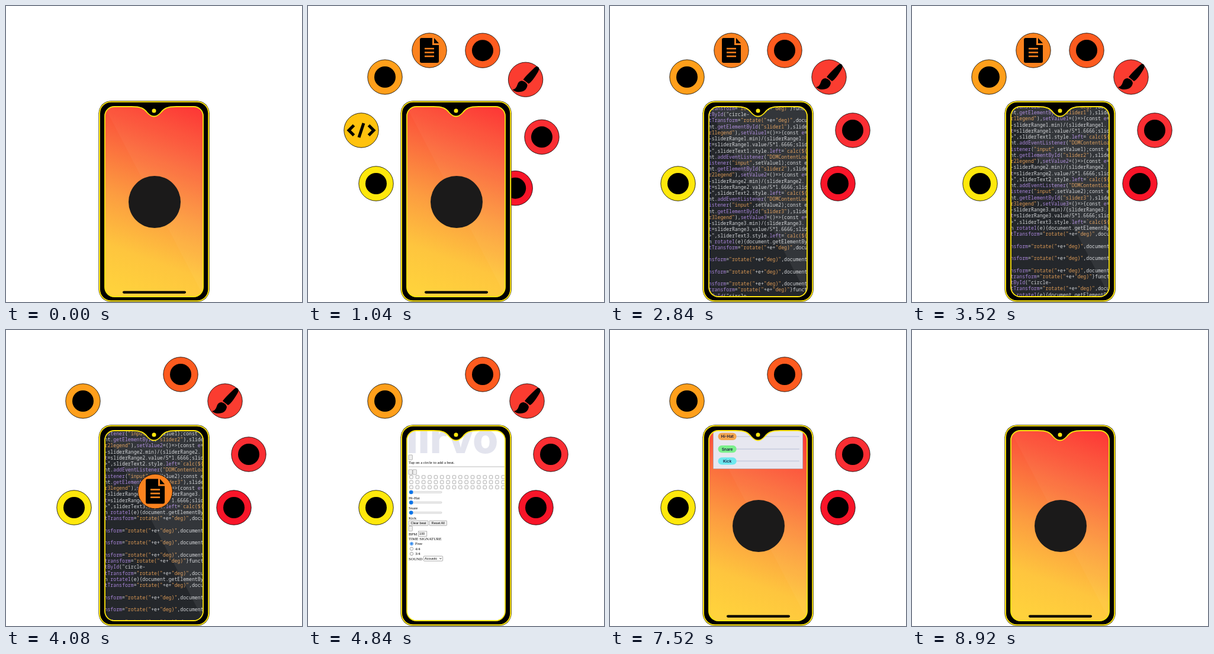
Recreate the animation shown at these times as an HTML page. Size 500x500 px, loop 9600 ms.

```html
<!DOCTYPE html>
<html lang="en">
<head>
<meta charset="utf-8">
<title>Phone and app icons</title>
<style>
html, body { margin: 0; width: 100%; height: 100%; overflow: hidden; background: #fff; }
svg { display: block; width: 100vw; height: 100vh; }
.mono { font: 8.2px "Noto Sans Mono", "DejaVu Sans Mono", monospace; fill: #d3d5d8; white-space: pre; }
.mono .s { fill: #dd9a55; }
.mono .f { fill: #ab87dc; }
.serif { font: 6.75px "Liberation Serif", serif; }
.ui { font: 5.65px "Liberation Sans", sans-serif; }
.mark { font-family: Inter, sans-serif; font-weight: 800; }
.chip { font: 600 7.8px Inter, sans-serif; fill: #16183f; text-anchor: middle; }
.btn { fill: #efefef; stroke: #777; stroke-width: .5; }
.box { fill: #fff; stroke: #777; stroke-width: .6; }
</style>
</head>
<body>
<svg viewBox="0 0 500 500">
  <defs>
    <path id="shape" d="M183 170H212C228 170 233 173 238.5 180Q250 193 261.5 180C267 173 272 170 288 170H317A16 16 0 0 1 333 186V475A16 16 0 0 1 317 491H183A16 16 0 0 1 167 475V186A16 16 0 0 1 183 170Z"/>
    <clipPath id="clip"><use href="#shape"/></clipPath>
    <linearGradient id="wall" gradientUnits="userSpaceOnUse" x1="318" y1="168" x2="202" y2="486">
      <stop offset="0" stop-color="#fd302f"/>
      <stop offset=".28" stop-color="#fb663d"/>
      <stop offset=".55" stop-color="#fc9c40"/>
      <stop offset=".8" stop-color="#fec53e"/>
      <stop offset="1" stop-color="#ffd23c"/>
    </linearGradient>
    <radialGradient id="glow">
      <stop offset=".5" stop-color="#2f3a9c" stop-opacity=".75"/>
      <stop offset="1" stop-color="#2f3a9c" stop-opacity="0"/>
    </radialGradient>
  </defs>

  <g id="back"></g>

  <rect x="156.5" y="160.2" width="187.2" height="339.6" rx="21"/>
  <rect x="158" y="161.7" width="184.2" height="336.6" rx="19.5" fill="none" stroke="#ffe60d" stroke-width="2"/>

  <g clip-path="url(#clip)">
    <rect x="166" y="168" width="168" height="324" fill="url(#wall)"/>
    <path d="M166 169H334V491Z" fill="#fff" opacity=".03"/>
    <circle cx="251" cy="331" r="44" fill="#1b1a1a"/>
    <rect x="197" y="481.5" width="107" height="4.2" rx="2.1"/>
    <g id="code">
      <rect x="162" y="165" width="176" height="328" fill="#24272b"/>
      <g id="lines" class="mono"></g>
      <path d="M166 169H334V491Z" fill="#fff" opacity=".07"/>
    </g>
    <g id="page"></g>
    <g id="app"></g>
  </g>
  <use href="#shape" fill="none" stroke="#ffe60d" stroke-width="1.8"/>
  <circle cx="250" cy="177" r="3.5" fill="#ffe60d"/>

  <g id="front"></g>
</svg>

<script>
const LOOP = 9600, STEP = 40;
const $ = id => document.getElementById(id);
const rect = (x, y, w, h, more = '') => `<rect x="${x}" y="${y}" width="${w}" height="${h}" ${more}/>`;
const dot = (x, y, r, more = '') => `<circle cx="${x}" cy="${y}" r="${r}" ${more}/>`;
const text = (x, y, s, more = '') => `<text x="${x}" y="${y}" ${more}>${s}</text>`;
const times = (n, fn) => Array.from({ length: n }, (_, i) => fn(i)).join('');

// --- icons ---
const plain = () => dot(0, 0, 18);
const codeGlyph = () => `<path d="M-12.5-8.5L-21 0L-12.5 8.5M12.5-8.5L21 0L12.5 8.5M4-12L-4 12" fill="none" stroke="#000" stroke-width="5"/>`;
const docGlyph = c => `<path d="M-16-18Q-16-21-13-21H5V-9H16V18Q16 21 13 21H-13Q-16 21-16 18ZM8-21L16-12H8Z"/>
  <path d="M-8-3H8M-8 3.5H8M-8 10H8" stroke="${c}" stroke-width="2.6"/>`;
const brushGlyph = () => `<path d="M20-22Q25-20 21-13Q11 4 5 7L-4 0Q0-6 14-19Q18-23 20-22Z"/>
  <path d="M-6 2Q2 4 3 10Q1 21-12 21Q-18 21-22 17Q-16 16-14 9Q-12 2-6 2Z"/>`;

const HUB = [250, 310];
const icons = [
  { at: [115, 300], color: '#ffe80c', glyph: plain },
  { at: [90, 210], color: '#ffc20e', glyph: codeGlyph, go: 1920, open: 2400, bend: [306, 215] },
  { at: [130, 120], color: '#ff9f1b', glyph: plain },
  { at: [205, 75], color: '#fb821e', glyph: docGlyph, go: 3840, open: 4320, bend: [262, 190] },
  { at: [295, 75], color: '#fd5b1f', glyph: plain },
  { at: [370, 120], color: '#fb3c30', glyph: brushGlyph, go: 5280, open: 5760, bend: [122, 200] },
  { at: [410, 210], color: '#fa2e33', glyph: plain },
  { at: [385, 300], color: '#f91529', glyph: plain }
];
let rest = 0;
icons.forEach((ic, i) => {
  ic.el = document.createElementNS('http://www.w3.org/2000/svg', 'g');
  ic.el.innerHTML = dot(0, 0, 29.2, `fill="${ic.color}" stroke="#000" stroke-width=".8"`) + ic.glyph(ic.color);
  ic.start = 320 + i * 80;
  if (!ic.go) ic.leave = 7920 + rest++ * 120;
  $('back').append(ic.el);
});

// --- code screen ---
const block = n => [
  `nt.getElementById("slider${n}"),slider`,
  `r${n}legend"),setValue${n}=()=>{const e=`,
  `-sliderRange${n}.min)/(sliderRange${n}.`,
  `t=sliderRange${n}.value/5*1.6666;slid`,
  `>",sliderText${n}.style.left=\`calc(\${e`,
  `nt.addEventListener("DOMContentLoad`,
  `istener("input",setValue${n});const e`
];
const turn = 'nsform="rotate("+e+"deg)",document';
const tail = [
  'n rotate1(e){document.getElementBy', 'tTransform="rotate("+e+"deg)",docum', '', turn, '', turn, '',
  turn, 'transform="rotate("+e+"deg)"}funct', 'tById("circle-', 'tTransform="rotate("+e+"deg)",docum'
];
const rows = [...tail, ...block(1), ...block(2), ...block(3).slice(0, 5), ...tail, ...tail];
const paint = s => s.replace(/("[^"]*"|"\w+$|^r\dlegend"|`.*$)|(\b[A-Za-z]\w*(?=[(=]))|>/g, (m, str, fn) =>
  str ? `<tspan class="s">${str}</tspan>` : fn ? `<tspan class="f">${fn}</tspan>` : '&gt;');
$('lines').innerHTML = rows.map((s, i) => text(166.5, 183 + (i - tail.length) * 10.25, paint(s))).join('');

// --- unstyled page ---
const button = (x, y, w, s = '') => rect(x, y, w, 8.4, 'class="btn" rx="1"') + text(x + w / 2, y + 6.2, s, 'class="ui" text-anchor="middle"');
const slider = (y, label) => rect(171, y - 1.3, 55, 2.6, 'rx="1.3" fill="#efefef" stroke="#b2b2b2" stroke-width=".5"') +
  dot(174.2, y, 3.3, 'fill="#0d75e8"') + text(170, y + 11.6, label);
const radio = (y, label, on) => dot(175, y, 2.7, `fill="#fff" stroke="${on ? '#0d75e8' : '#777'}" stroke-width=".7"`) +
  (on ? dot(175, y, 1.7, 'fill="#0d75e8"') : '') + text(181, y + 2.4, label);
$('page').innerHTML = rect(162, 165, 176, 328, 'fill="#fff"') +
  text(166, 208, 'lirvo', 'class="mark" font-size="70" fill="#e3e4ee"') +
  '<g class="serif">' + button(170, 211, 6.4) + text(170, 226, 'Tap on a circle to add a beat.') +
  rect(170, 230.6, 164, .8, 'fill="#aaa"') + button(170, 235.8, 6.4) + button(177, 235.8, 6.4) +
  times(48, i => rect(171.8 + i % 16 * 10.35, 245.7 + (i >> 4) * 8.6, 5.4, 5.4, 'class="box" rx="1"')) +
  slider(274, 'Hi-Hat') + slider(291.4, 'Snare') + slider(308.6, 'Kick') +
  button(170, 322, 33, 'Clear beat') + button(205, 322, 29.5, 'Reset All') + button(170, 331.3, 6.4) +
  text(170, 346.5, 'BPM') + rect(186.3, 340, 14.5, 8.4, 'class="box"') + text(187.8, 346.3, '100', 'class="ui"') +
  text(170, 355, 'TIME SIGNATURE') + radio(361, 'Free', true) + radio(369.6, '4/4') + radio(378, '3/4') +
  text(170, 388.5, 'SOUND') + rect(195.3, 382, 32.3, 8.2, 'class="box" rx="1"') + text(197, 388, 'Acoustic', 'class="ui"') +
  '<path d="M222.2 385.3l1.6 1.7l1.6-1.7" fill="none" stroke="#000" stroke-width=".8"/></g>';

// --- styled app ---
const CX = 250.5, CY = 303;
const ring = r => dot(CX, CY, r, 'fill="none" stroke="#f1f1f7" stroke-width="1.9"') + times(12, i => {
  const a = i * Math.PI / 6;
  return dot(CX + r * Math.sin(a), CY - r * Math.cos(a), 5.2, 'fill="#1b1d40" stroke="#8d90a8" stroke-width=".8"');
});
const chip = (y, label, color) => rect(206, y - 1, 125, 2, 'rx="1" fill="#cbcfe1"') +
  rect(172, y - 7, 36, 14, `rx="7" fill="${color}"`) + text(190, y + 2.8, label, 'class="chip"');
$('app').innerHTML = rect(162.5, 165, 175, 325, 'fill="#13143b"') +
  '<path d="M166 169H334V491Z" fill="#fff" opacity=".07"/>' +
  text(169, 193.5, 'lirvo', 'class="mark" font-size="25" fill="#eeeef5"') +
  times(3, i => dot(315 + i * 5, 188, 2.3, 'fill="#f1f1f7"')) +
  rect(162.5, 200.6, 175, .8, 'fill="#2e3050"') +
  dot(CX, CY, 36, 'fill="url(#glow)"') + rect(248, 232, 5, 60, 'fill="#303c98"') +
  [74.5, 56.5, 39].map(ring).join('') +
  dot(CX, CY, 22.5, 'fill="#343d92"') + '<path d="M246.5 297L257 303L246.5 309.5Z" fill="#f4f4fa" stroke="#f4f4fa" stroke-width="2" stroke-linejoin="round"/>' +
  '<path d="M162.5 418Q166 405 182 405H312Q330 405 337.5 392V490H162.5Z" fill="#e7e7f0"/>' +
  chip(427, 'Hi-Hat', '#f2a650') + chip(451.5, 'Snare', '#7bf08c') + chip(475, 'Kick', '#6ee8ef');

// --- motion ---
const part = (t, from, to) => Math.min(1, Math.max(0, (t - from) / (to - from)));
const smooth = p => p * p * (3 - 2 * p);
const easeOut = p => 1 - (1 - p) ** 3;
const mix = (a, b, p) => a + (b - a) * p;
const move = (el, x, y, s = 1) => el.setAttribute('transform', `translate(${x} ${y}) scale(${s})`);
const zoom = (el, s, [x, y], dy = 0) => move(el, x - x * s, y - y * s + dy, s);
const show = (el, on) => { el.style.display = on ? '' : 'none'; };

function placeIcon(ic, t) {
  const { el, at, go, open, bend } = ic;
  const layer = go && t >= go ? $('front') : $('back');
  if (el.parentNode !== layer) layer.append(el);
  if (go && t >= go) {
    const p = smooth(part(t, go, go + 320)), q = 1 - p;
    const [x, y] = at.map((a, k) => q * q * a + 2 * p * q * bend[k] + p * p * HUB[k]);
    const gone = part(t, open, open + 240);
    move(el, x, y);
    el.style.opacity = 1 - gone;
    show(el, gone < 1);
    return;
  }
  const out = easeOut(part(t, ic.start, ic.start + 440));
  const back = ic.leave ? part(t, ic.leave, ic.leave + 480) ** 2 : 0;
  const p = out * (1 - back);
  move(el, mix(250, at[0], p), mix(330, at[1], p));
  el.style.opacity = 1;
  show(el, p > 0);
}

function draw(t) {
  icons.forEach(ic => placeIcon(ic, t));

  show($('code'), t > 2400 && t < 4840);
  zoom($('code'), easeOut(part(t, 2400, 2920)), HUB);
  move($('lines'), 0, 90 * (smooth(1 / 3) - smooth(part(t, 3360, 3840))));

  show($('page'), t > 4320 && t < 6240);
  zoom($('page'), easeOut(part(t, 4320, 4840)), HUB);

  show($('app'), t > 5760 && t < 7680);
  $('app').style.opacity = part(t, 5760, 6240);
  zoom($('app'), mix(1, .865, smooth(part(t, 6720, 7000))), [250, 330], -306 * part(t, 7000, 7680));
}

const begin = performance.now();
function frame() {
  const t = (performance.now() - begin) % LOOP;
  draw(Math.floor(t / STEP) * STEP);
  requestAnimationFrame(frame);
}
frame();
</script>
</body>
</html>
```
